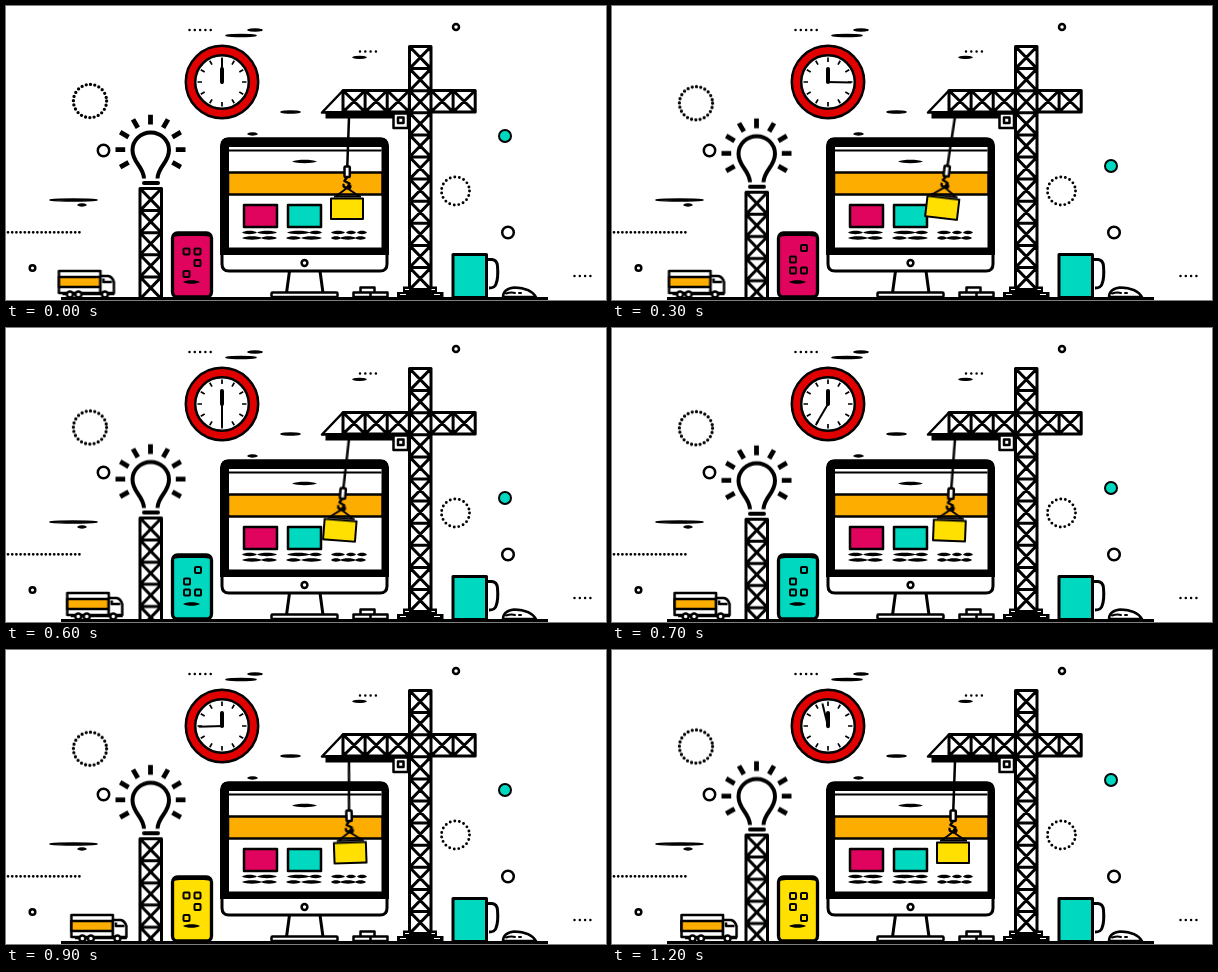
Animation, 600 px wide and 294 px high, one loop 1300 ms. Source, as an HTML page:

```html
<!DOCTYPE html>
<html lang="en">
<head>
<meta charset="utf-8">
<title>Website under construction</title>
<style>
  html, body { margin: 0; width: 100%; height: 100%; overflow: hidden; background: #fff; }
  svg { display: block; width: 100%; height: 100%; }
  :root { --pink: #e0045f; --teal: #00d8c0; --yellow: #ffe000; --orange: #fdad00; }

  .ink { fill: none; stroke: #000; stroke-width: 3; stroke-linejoin: round; }
  .w2 { stroke-width: 2; }
  .w25 { stroke-width: 2.5; }
  .w4 { stroke-width: 4; }
  .round { stroke-linecap: round; }
  .white { fill: #fff; }
  .pink { fill: var(--pink); }
  .teal { fill: var(--teal); }
  .yellow { fill: var(--yellow); }
  .orange { fill: var(--orange); }
  .red { fill: #e00000; }

  /* The loop is 13 held poses of 100 ms; the small lead avoids ties at the edges. */
  .move { animation: 1300ms -4ms infinite; }
  #minute { animation-name: minute; animation-timing-function: steps(2); transform-origin: 216px 76px; }
  #load { animation-name: swing; transform-origin: 343px 111px; }
  #truck { animation-name: drive; animation-timing-function: steps(13); }
  #bulb { animation-name: bob; --step: 1.25px; }
  #ring { animation-name: bob; --step: 0.75px; }
  #dot { animation-name: dot; }
  #phone { animation-name: tint; animation-timing-function: step-end; }
  .keys { animation-timing-function: step-end; }
  #keysA { animation-name: keysA; }
  #keysB { animation-name: keysB; }
  #keysC { animation-name: keysC; }

  @keyframes minute {
    0% { transform: rotate(0deg); }
    15.385% { transform: rotate(64deg); }
    30.769% { transform: rotate(118deg); }
    46.154% { transform: rotate(180deg); }
    61.538% { transform: rotate(241deg); }
    76.923% { transform: rotate(296deg); }
    92.308%, 100% { transform: rotate(346deg); }
  }
  @keyframes swing {
    0% { transform: rotate(0deg); animation-timing-function: steps(4); }
    30.769% { transform: rotate(9deg); animation-timing-function: steps(4); }
    61.538% { transform: rotate(0deg); animation-timing-function: steps(2); }
    76.923% { transform: rotate(-4deg); animation-timing-function: steps(2); }
    92.308%, 100% { transform: rotate(0deg); }
  }
  @keyframes drive {
    from { transform: translateX(-0.6px); }
    to { transform: translateX(17.4px); }
  }
  @keyframes bob {
    0% { transform: translateY(0); animation-timing-function: steps(7); }
    53.846% { transform: translateY(calc(7 * var(--step))); animation-timing-function: steps(6); }
    100% { transform: translateY(var(--step)); }
  }
  @keyframes dot {
    0% { transform: translateY(0); animation-timing-function: steps(4); }
    30.769% { transform: translateY(40px); animation-timing-function: steps(1); }
    38.462% { transform: translateY(43px); animation-timing-function: steps(1); }
    46.154% { transform: translateY(40px); animation-timing-function: steps(4); }
    76.923% { transform: translateY(0); animation-timing-function: steps(1); }
    84.615% { transform: translateY(-3px); animation-timing-function: steps(1); }
    92.308%, 100% { transform: translateY(0); }
  }
  @keyframes tint {
    0% { fill: var(--pink); }
    30.769% { fill: var(--teal); }
    61.538%, 100% { fill: var(--yellow); }
  }
  @keyframes keysA {
    0%, 30.769%, 61.538% { opacity: 1; }
    15.385%, 46.154%, 76.923%, 100% { opacity: 0; }
  }
  @keyframes keysB {
    0%, 30.769%, 61.538%, 92.308%, 100% { opacity: 0; }
    15.385%, 46.154%, 76.923% { opacity: 1; }
  }
  @keyframes keysC {
    0% { opacity: 0; }
    92.308%, 100% { opacity: 1; }
  }
</style>
</head>
<body>
<svg viewBox="0 0 600 294">
  <defs>
    <clipPath id="aboveGround"><rect width="600" height="292"/></clipPath>
    <rect id="key" class="ink w2" x="-3" y="-3" width="6" height="6" rx="1"/>
  </defs>

  <!-- floating marks -->
  <path id="dashes" class="ink" style="fill:#000;stroke-width:1.4"/>
  <g class="ink round w25">
    <path d="M183.500 24H206M354 45.500H371M568.500 270H586" stroke-dasharray="0 5.3"/>
    <path d="M2 226.300H74" stroke-dasharray="0 4.2" stroke-width="2.8"/>
    <circle cx="97.500" cy="144.500" r="5.700"/>
    <circle cx="450" cy="21" r="3"/>
    <circle cx="26.500" cy="262" r="2.800"/>
    <circle cx="502" cy="226.500" r="5.800"/>
    <circle cx="449.500" cy="185" r="14" stroke-dasharray="0 4.630" style="stroke-width:2.900"/>
    <circle id="ring" class="move" cx="84" cy="95" r="16.600" stroke-dasharray="0 4.346" style="stroke-width:3.300"/>
  </g>
  <circle id="dot" class="ink w2 teal move" cx="499" cy="130" r="6"/>

  <!-- clock -->
  <circle class="ink w25 red" cx="216" cy="76" r="36.200"/>
  <circle class="ink w25 white" cx="216" cy="76" r="26.800"/>
  <path id="ticks" class="ink" style="stroke-width:1.700"/>
  <path class="ink w4 round" d="M216 76V63"/>
  <path id="minute" class="ink w2 round move" d="M216 77V53.500"/>

  <!-- bulb on its tower -->
  <g clip-path="url(#aboveGround)">
    <g id="bulb" class="move">
      <path id="tower" class="ink"/>
      <path class="ink w4 round" d="M138 177H152"/>
      <path class="ink w4"
        d="M138 172.500C137.500 160 126.500 157 126.500 144A18.200 17.500 0 0 1 163 144C163 157 152 160 151.500 172.500"/>
      <path id="rays" class="ink" style="stroke-width:4.800"/>
    </g>
  </g>

  <!-- phone -->
  <rect id="phone" class="ink move" x="166.500" y="227" width="39" height="64" rx="5" style="stroke-width:3.300"/>
  <path d="M166 232Q166 226 172 226H200Q206 226 206 232Q203 230 198 230H174Q169 230 166 232Z"/>
  <path id="home"/>
  <g id="keysA" class="keys move"></g>
  <g id="keysB" class="keys move"></g>
  <g id="keysC" class="keys move"></g>

  <!-- truck -->
  <g id="truck" class="ink w25 move">
    <path class="white" d="M53.500 265H95V287H53.500Z"/>
    <path class="orange" d="M53.500 271H95V281H53.500Z"/>
    <path class="white" d="M95 270H103Q107 271 108.500 276V287H95Z"/>
    <path d="M98 272.500V276H106.500M57 288H109"/>
    <circle class="white" cx="64.500" cy="288.500" r="3"/>
    <circle class="white" cx="73" cy="288.500" r="3"/>
    <circle class="white" cx="99.500" cy="288.500" r="3"/>
  </g>

  <!-- monitor -->
  <path class="ink" d="M283.500 265L280.500 287M314 265L317 287"/>
  <rect class="ink w25 white" x="265.500" y="286.500" width="66" height="4.500" rx="1"/>
  <path class="ink white" d="M216 140Q216 133 223 133H374Q381 133 381 140V258Q381 265 374 265H223Q216 265 216 258Z"/>
  <path d="M214 249V140Q214.500 131.500 222 131.500H375Q382.500 131.500 383 140V249Z"/>
  <path class="white" d="M223 141H375.500V241.500H223Z"/>
  <circle class="ink w25" cx="298.500" cy="257" r="2.900"/>
  <path class="ink w2" d="M223 144.500H375.500"/>
  <path class="ink w25 orange" d="M222 166.500H376.500V188.500H222Z"/>
  <rect class="ink w25 pink" x="238" y="199" width="33" height="22"/>
  <rect class="ink w25 teal" x="282" y="199" width="33" height="22"/>
  <path id="copy"/>

  <!-- crane -->
  <path id="crane" class="ink"/>
  <path class="ink w25" d="M337 84.500L316 106.500H338"/>
  <path d="M319.500 105H388V112.500H319.500Z"/>
  <rect class="ink w25 white" x="387.500" y="107.500" width="14.500" height="14.500"/>
  <rect class="ink w25" x="392" y="111.500" width="5.500" height="5.500"/>
  <path d="M391 292V286H397V280.500H405V284H424V280.500H431V286H437.500V292Z"/>
  <path class="ink" style="stroke:#fff;stroke-width:1" d="M399 283.500H403M425.500 283.500H429M394 288.500H400M428 288.500H434"/>
  <path class="ink w25 white" d="M354.500 286V281.500H368.500V286M347.500 286.500H381.500V291H347.500ZM364.500 286.500V291"/>

  <g id="load" class="ink w2 move">
    <path class="w25" d="M343 111L341.300 160"/>
    <rect class="white w25" x="338.500" y="160.500" width="5.300" height="10.500" rx="1"/>
    <path class="w25" d="M341 171L338.500 175L343.500 177.500L341 182Q336 181 338 178M341 182Q345.500 183 344 179"/>
    <path d="M341 182L329.500 190.500M341 182L353.500 190.500M328 190.500H355"/>
    <rect class="yellow" x="325" y="192.500" width="32" height="20.500"/>
  </g>

  <!-- mug and mouse -->
  <path class="ink" d="M481 253.500H486Q491 254 491.500 260Q492.500 272 490 278Q489 282 483 282"/>
  <rect class="ink teal" x="447" y="248.500" width="33.500" height="43"/>
  <path class="ink w25 white" d="M497 291Q497 283 508 281.500Q525 282 530 291Z"/>
  <path class="ink w2 round" d="M500 287.500Q505 286 509 287M513 287H515"/>

  <path class="ink" d="M55 292.500H542"/>
</svg>

<script>
  const el = id => document.getElementById(id);
  const draw = (id, d) => el(id).setAttribute("d", d);

  // A hand-drawn dash: a thin lens from x1 to x2.
  const lens = (y, h) => ([x1, x2]) => {
    const bend = (x2 - x1) * 0.2;
    return `M${x1} ${y}C${x1 + bend} ${y - h} ${x2 - bend} ${y - h} ${x2} ${y}` +
      `C${x2 - bend} ${y + h} ${x1 + bend} ${y + h} ${x1} ${y}Z`;
  };

  // Cross-braced cells, run downwards or to the right.
  function truss(x, y, w, h, count, across) {
    let d = "";
    for (let i = 0; i < count; i++) {
      const l = x + (across ? i * w : 0), t = y + (across ? 0 : i * h);
      d += `M${l} ${t}h${w}v${h}h${-w}zl${w} ${h}m0 ${-h}l${-w} ${h}`;
    }
    return d;
  }

  // Short strokes around a centre, at angles clockwise from the top.
  const spokes = (cx, cy, r1, r2, angles) => angles.map(a => {
    const s = Math.sin(a * Math.PI / 180), c = Math.cos(a * Math.PI / 180);
    return `M${cx + r1 * s} ${cy - r1 * c}L${cx + r2 * s} ${cy - r2 * c}`;
  }).join("");

  const marks = [
    [29.5, 220, 250], [24, 242, 256], [51.3, 347, 360], [106, 275, 294],
    [128, 242, 251], [194, 44, 91], [199, 72, 80]
  ];
  draw("dashes", marks.map(([y, a, b]) => lens(y, 1.3)([a, b])).join(""));
  draw("home", lens(276, 2.4)([177, 194]));

  const rows = [
    [155.5, [[286, 311]]],
    [226.5, [[236, 251], [251, 271], [281, 304], [303, 316], [325, 339], [340, 350], [351, 361]]],
    [232, [[236, 256], [255, 271], [280, 295], [295, 316], [325, 335], [334, 350], [349, 360]]]
  ];
  draw("copy", rows.map(([y, spans]) => spans.map(lens(y, 2.2)).join("")).join(""));

  draw("ticks", spokes(216, 76, 20, 24.5, [...Array(12).keys()].map(i => i * 30)));
  draw("rays", spokes(144.5, 143.7, 25.3, 35, [-120, -90, -60, -30, 0, 30, 60, 90, 120]));
  draw("tower", truss(134, 182.5, 21.5, 22.1, 5, false));
  draw("crane", truss(403.5, 40.5, 21.5, 22.1, 11, false) +
    truss(337, 84.5, 22.1, 21.5, 3, true) + truss(425, 84.5, 22.1, 21.5, 2, true));

  const keys = {
    keysA: [[180.5, 245.5], [191.5, 245.5], [191.5, 257], [180.5, 268]],
    keysB: [[192, 242], [181, 253.5], [181, 264.5], [192, 264.5]],
    keysC: [[181, 246], [192, 246], [181, 257], [192, 268]]
  };
  for (const id in keys)
    el(id).innerHTML = keys[id].map(([x, y]) => `<use href="#key" x="${x}" y="${y}"/>`).join("");
</script>
</body>
</html>
```
